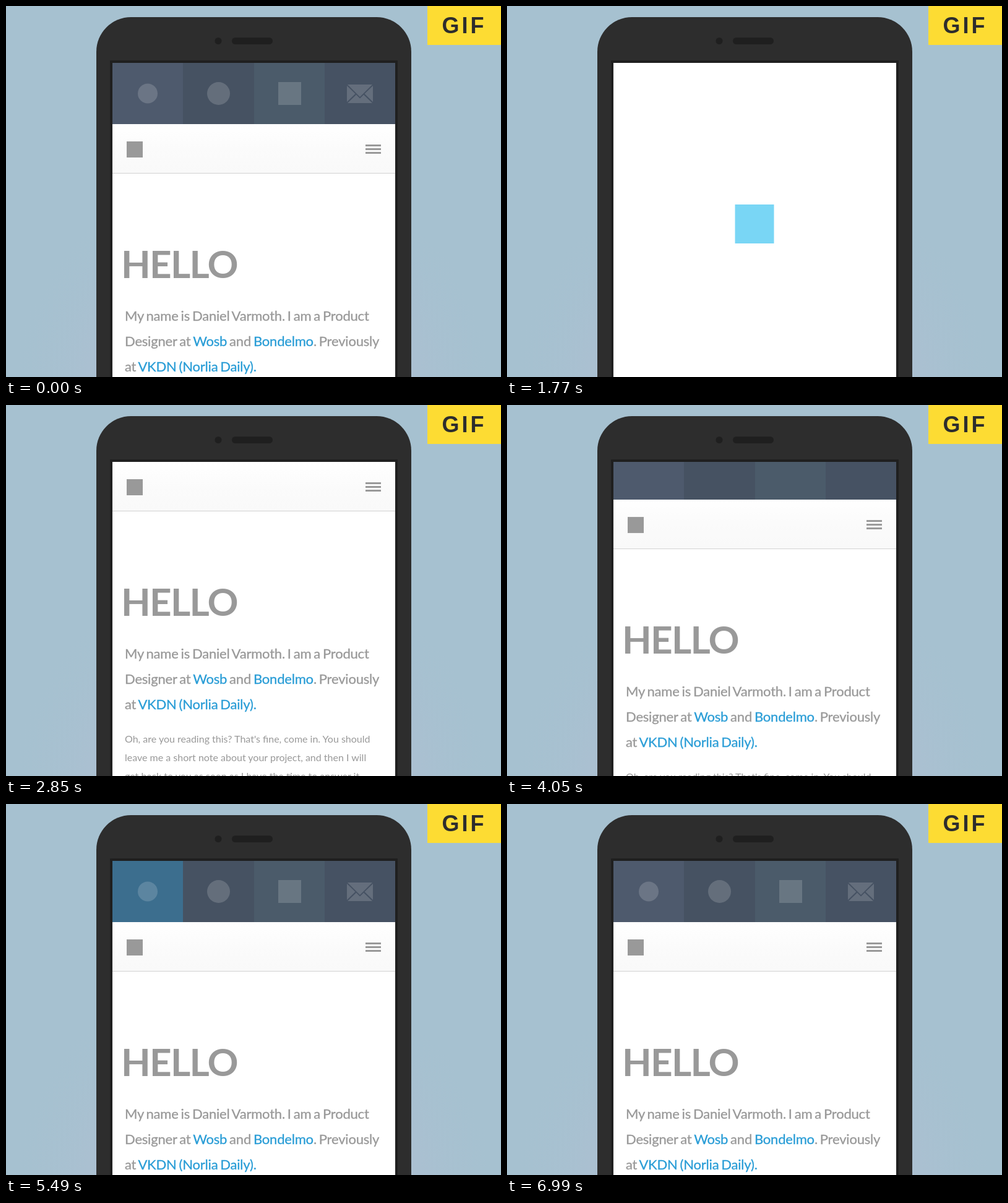
Animation of 800x600 px, one loop 7.56 s. Source, as an HTML page:

```html
<!DOCTYPE html>
<html lang="en">
<head>
<meta charset="utf-8">
<title>Mobile page load</title>
<style>
  html, body { margin: 0; width: 100%; height: 100%; overflow: hidden; background: #a6c1d0; }
  svg { display: block; width: 800px; height: 600px; }

  .page, .sheet, .head, .copy, .icons, .loader, .hover {
    animation: 7560ms linear infinite;
  }
  .page   { animation-name: page; }
  .sheet  { animation-name: sheet; }
  .head   { animation-name: head; }
  .copy   { animation-name: copy; }
  .icons  { animation-name: icons; fill: #fff; fill-opacity: .165; }
  .loader { animation-name: loader; fill: #5bcdf3; opacity: 0; }
  .hover  { animation-name: hover; animation-delay: calc(var(--i) * 470ms); opacity: 0; }

  /* The old page fades out, then returns with its parts still hidden. */
  @keyframes page {
    0%, 9.127% { opacity: 1; }
    11.905%, 29.4% { opacity: 0; }
    29.41%, 100% { opacity: 1; }
  }
  /* The white sheet slides down and uncovers the links bar. */
  @keyframes sheet {
    0%, 11.92% { transform: translateY(99px); }
    11.93% { transform: none; }
    50.595% { transform: none; animation-timing-function: cubic-bezier(.65, 0, .35, 1); }
    56.11%, 100% { transform: translateY(99px); }
  }
  @keyframes head {
    0%, 11.92% { transform: none; }
    11.93% { transform: translateY(-90px); }
    29.563% { transform: translateY(-90px); animation-timing-function: cubic-bezier(.65, 0, .35, 1); }
    37.698%, 100% { transform: none; }
  }
  @keyframes copy {
    0%, 11.92% { transform: none; opacity: 1; }
    11.93% { transform: translateY(100px); opacity: 0; }
    29.563% { transform: translateY(100px); opacity: 0; animation-timing-function: cubic-bezier(.65, 0, .35, 1); }
    37.698%, 100% { transform: none; opacity: 1; }
  }
  @keyframes icons {
    0%, 11.92% { opacity: 1; }
    11.93%, 56.349% { opacity: 0; }
    60.714%, 100% { opacity: 1; }
  }
  @keyframes loader {
    0%, 9.127% { opacity: 0; }
    11.905% { opacity: 1; animation-timing-function: ease-in-out; }
    16.667% { opacity: .5; animation-timing-function: ease-in-out; }
    21.429% { opacity: 1; animation-timing-function: ease-in-out; }
    26.19% { opacity: .5; animation-timing-function: ease-in-out; }
    30.952% { opacity: 1; animation-timing-function: ease-in-out; }
    35.714%, 100% { opacity: 0; }
  }
  @keyframes hover {
    0% { opacity: 0; }
    67.26% { opacity: 0; animation-timing-function: ease-in-out; }
    70.635% { opacity: 1; animation-timing-function: ease-in-out; }
    73.81%, 100% { opacity: 0; }
  }

  text { font-family: Lato, sans-serif; fill: #999; }
  .title { font-size: 62px; font-weight: 700; letter-spacing: -1.7px; }
  .lead { font-size: 22px; letter-spacing: -.2px; word-spacing: -1.5px; stroke: #999; stroke-width: .35px; }
  .lead tspan { fill: #2a9dd6; stroke: #2a9dd6; }
  .note { font-size: 16px; }
  .badge { font: 700 36px "Liberation Sans", Arial, sans-serif; letter-spacing: 4px; fill: #2d2d2d; }
</style>
</head>
<body>
<svg viewBox="0 0 800 600">
  <defs>
    <radialGradient id="glow" gradientUnits="userSpaceOnUse" cx="400" cy="640" r="400">
      <stop offset=".6" stop-color="#aebfd2" stop-opacity=".8"/>
      <stop offset="1" stop-color="#a6c1d0" stop-opacity="0"/>
    </radialGradient>
    <linearGradient id="shade" x2="0" y2="1">
      <stop offset="0" stop-color="#fff"/>
      <stop offset=".5" stop-color="#fbfbfb"/>
      <stop offset="1" stop-color="#f9f9f9"/>
    </linearGradient>
    <clipPath id="screen"><rect x="172" y="92" width="457" height="508"/></clipPath>
  </defs>

  <rect width="800" height="600" fill="#a6c1d0"/>
  <rect width="800" height="600" fill="url(#glow)"/>

  <!-- phone -->
  <rect x="146" y="18" width="509" height="700" rx="56" fill="#2d2d2d"/>
  <g fill="#1f1f1f">
    <circle cx="343" cy="56.5" r="5.5"/>
    <rect x="365" y="51" width="66" height="11" rx="5.5"/>
    <rect x="168" y="88" width="465" height="520" rx="1"/>
  </g>
  <rect x="172" y="92" width="457" height="508" fill="#fff"/>

  <g clip-path="url(#screen)">
    <g class="page">
      <!-- links bar -->
      <rect x="172" y="92" width="114" height="99" fill="#4e5a6d"/>
      <rect x="286" y="92" width="115" height="99" fill="#465262"/>
      <rect x="401" y="92" width="114" height="99" fill="#4b5b6a"/>
      <rect x="515" y="92" width="114" height="99" fill="#465263"/>
      <rect class="hover" style="--i:0" x="172" y="92" width="114" height="99" fill="#0fa2df"/>
      <rect class="hover" style="--i:1" x="286" y="92" width="115" height="99" fill="#ea4c89"/>
      <rect class="hover" style="--i:2" x="401" y="92" width="114" height="99" fill="#3f729b"/>
      <rect class="hover" style="--i:3" x="515" y="92" width="114" height="99" fill="#5bcdf3"/>
      <g class="icons">
        <circle cx="229" cy="141.5" r="16"/>
        <circle cx="343.5" cy="141.5" r="18.5"/>
        <rect x="440" y="123" width="37" height="37"/>
        <path d="M552 127H592L572 147ZM551 129V155L564.5 142ZM593 129V155L579.5 142ZM552 157H592L578 143.5L572 149.5L566 143.5Z"/>
      </g>

      <g class="sheet">
        <rect x="172" y="92" width="457" height="520" fill="#fff"/>
        <g class="copy">
          <text class="title" x="186" y="341">HELLO</text>
          <g class="lead">
            <text x="192" y="410">My name is Daniel Varmoth. I am a Product</text>
            <text x="192" y="451">Designer at <tspan>Wosb</tspan> and <tspan>Bondelmo</tspan>. Previously</text>
            <text x="192" y="492">at <tspan>VKDN (Norlia Daily).</tspan></text>
          </g>
          <g class="note">
            <text x="192" y="546">Oh, are you reading this? That's fine, come in. You should</text>
            <text x="192" y="576">leave me a short note about your project, and then I will</text>
            <text x="192" y="606">get back to you as soon as I have the time to answer it</text>
          </g>
        </g>
        <g class="head">
          <rect x="172" y="92" width="457" height="80" fill="url(#shade)"/>
          <rect x="172" y="171" width="457" height="1" fill="#d2d2d2"/>
          <rect x="195" y="120" width="26" height="26" fill="#999"/>
          <path d="M581 126.5H606M581 132.5H606M581 138.5H606" stroke="#999" stroke-width="3"/>
        </g>
      </g>
    </g>
    <rect class="loader" x="368.5" y="321" width="63" height="63"/>
  </g>

  <!-- corner badge -->
  <rect x="681" y="0" width="119" height="63" fill="#fddc33"/>
  <text class="badge" x="704.5" y="44">GIF</text>
</svg>
</body>
</html>
```
